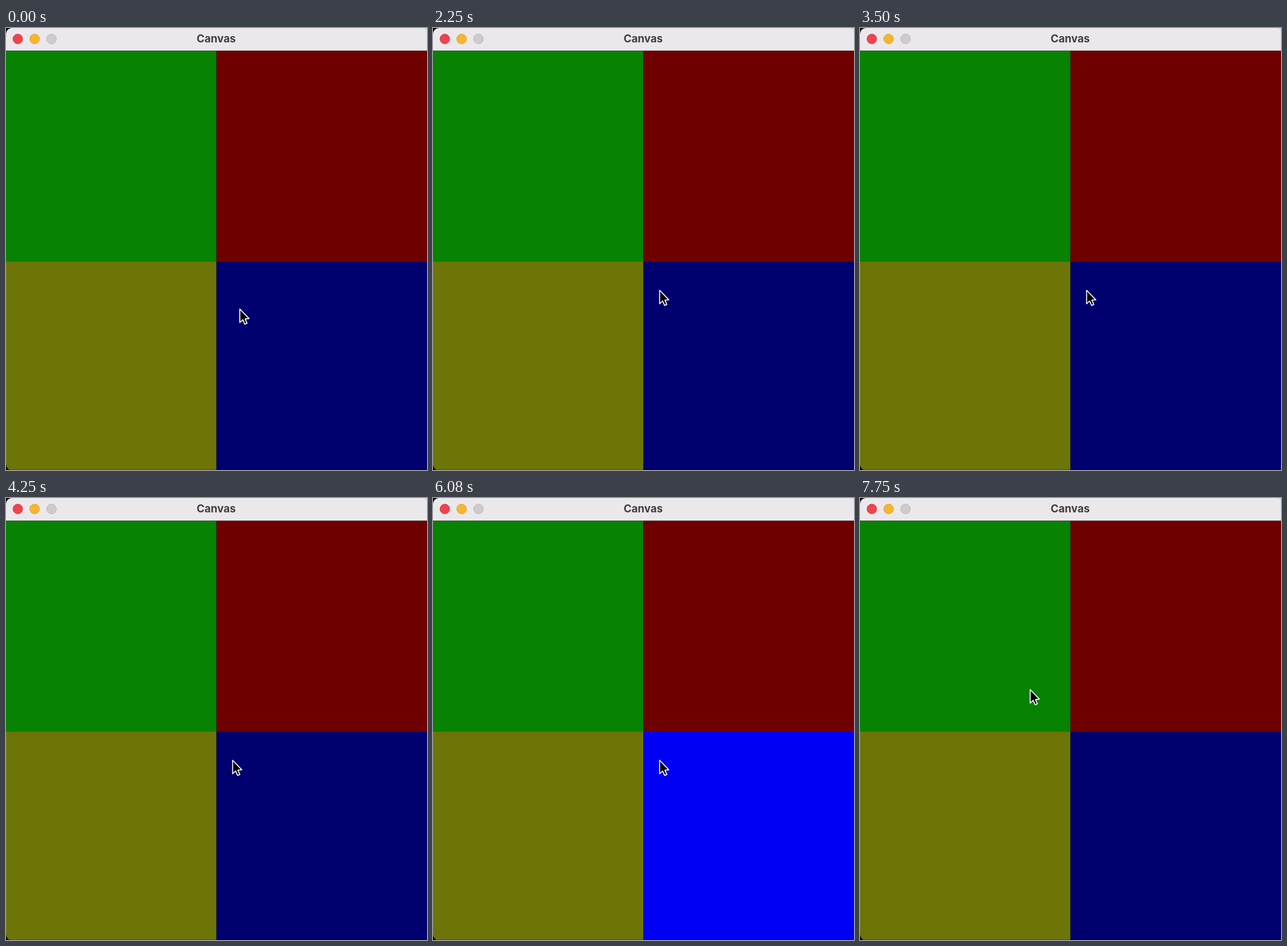
Write an HTML page that moves like this. It is 731x766 px and loops after 8000 ms.

```html
<!DOCTYPE html>
<html lang="en">
<head>
<meta charset="utf-8">
<title>Canvas</title>
<style>
  html, body { margin: 0; width: 100%; height: 100%; overflow: hidden; background: #000; }
  svg { display: block; width: 100vw; height: 100vh; }
  text { font: 700 18.6px Inter, "Open Sans", sans-serif; fill: #403c41; }
</style>
</head>
<body>
<svg viewBox="0 0 731 766" preserveAspectRatio="none">
  <defs>
    <clipPath id="window"><path d="M0 10Q1 1 10 0H724Q731 2 731 10V766H6Q1 763 0 757Z"/></clipPath>
  </defs>
  <path d="M720 0H731V12Z" fill="#d9d8d9"/>
  <g clip-path="url(#window)">
    <rect width="731" height="40" fill="#ebe8eb"/>
    <rect id="green" y="39.5" width="365.5" height="365.5"/>
    <rect id="red" x="365.5" y="39.5" width="365.5" height="365.5"/>
    <rect id="yellow" y="405" width="365.5" height="361"/>
    <rect id="blue" x="365.5" y="405" width="365.5" height="361"/>
    <path d="M0 39.5H731" stroke="#000" stroke-opacity=".45"/>
    <path d="M0 765.5H731" stroke="#000" stroke-opacity=".25"/>
    <path d="M.5 405V766" stroke="#fff" stroke-opacity=".1"/>
    <g stroke-width="1">
      <circle cx="20.5" cy="19" r="8.4" fill="#ef4350" stroke="#d83b46"/>
      <circle cx="49.7" cy="19" r="8.4" fill="#f5b62e" stroke="#dba12c"/>
      <circle cx="79" cy="19" r="8.4" fill="#cecbce" stroke="#b9b6b9"/>
    </g>
    <text x="365" y="25" text-anchor="middle">Canvas</text>
  </g>
  <path id="cursor" d="M0 0V23.5L5.2 18.7 8.7 26.3 12.5 24.6 9.2 17.2 16 16.6Z"
        fill="#000" stroke="#fff" stroke-width="1.7" stroke-linejoin="round"/>
</svg>
<script>
const LOOP = 8000;
const FLASH = 335;

// pad: [resting colour, lit colour]
const pads = {
  green: ["#078203", "#14ff08"],
  red: ["#6f0000", "#ff0000"],
  yellow: ["#6d7408", "#ffff0a"],
  blue: ["#00006f", "#0000f5"],
};

// [start, pad]
const sequence = [
  [1000, "green"], [1670, "green"], [2420, "green"], [3080, "yellow"],
  [3830, "blue"], [4500, "green"], [5170, "blue"], [5920, "blue"],
];

// [time, x, y] of the pointer tip
const pointer = [
  [0, 406, 487], [830, 348, 465], [1250, 349.5, 464.5], [1500, 393.5, 454.5],
  [6250, 393.5, 454.5], [7000, 352, 396], [7750, 295.5, 332], [LOOP, 295.5, 332],
];

const byId = id => document.getElementById(id);
const smooth = p => p * p * (3 - 2 * p);

function pointerAt(t) {
  const next = pointer.findIndex(step => step[0] > t);
  const [t0, x0, y0] = pointer[next - 1];
  const [t1, x1, y1] = pointer[next];
  const p = smooth((t - t0) / (t1 - t0));
  return [x0 + (x1 - x0) * p, y0 + (y1 - y0) * p];
}

function draw(now) {
  const t = now % LOOP;
  const active = sequence.find(([start]) => t >= start && t < start + FLASH);
  for (const [name, [rest, lit]] of Object.entries(pads)) {
    byId(name).setAttribute("fill", active && active[1] === name ? lit : rest);
  }
  byId("cursor").setAttribute("transform", `translate(${pointerAt(t)})`);
}

const began = performance.now();
function tick() {
  draw(performance.now() - began);
  requestAnimationFrame(tick);
}
tick();
</script>
</body>
</html>
```
